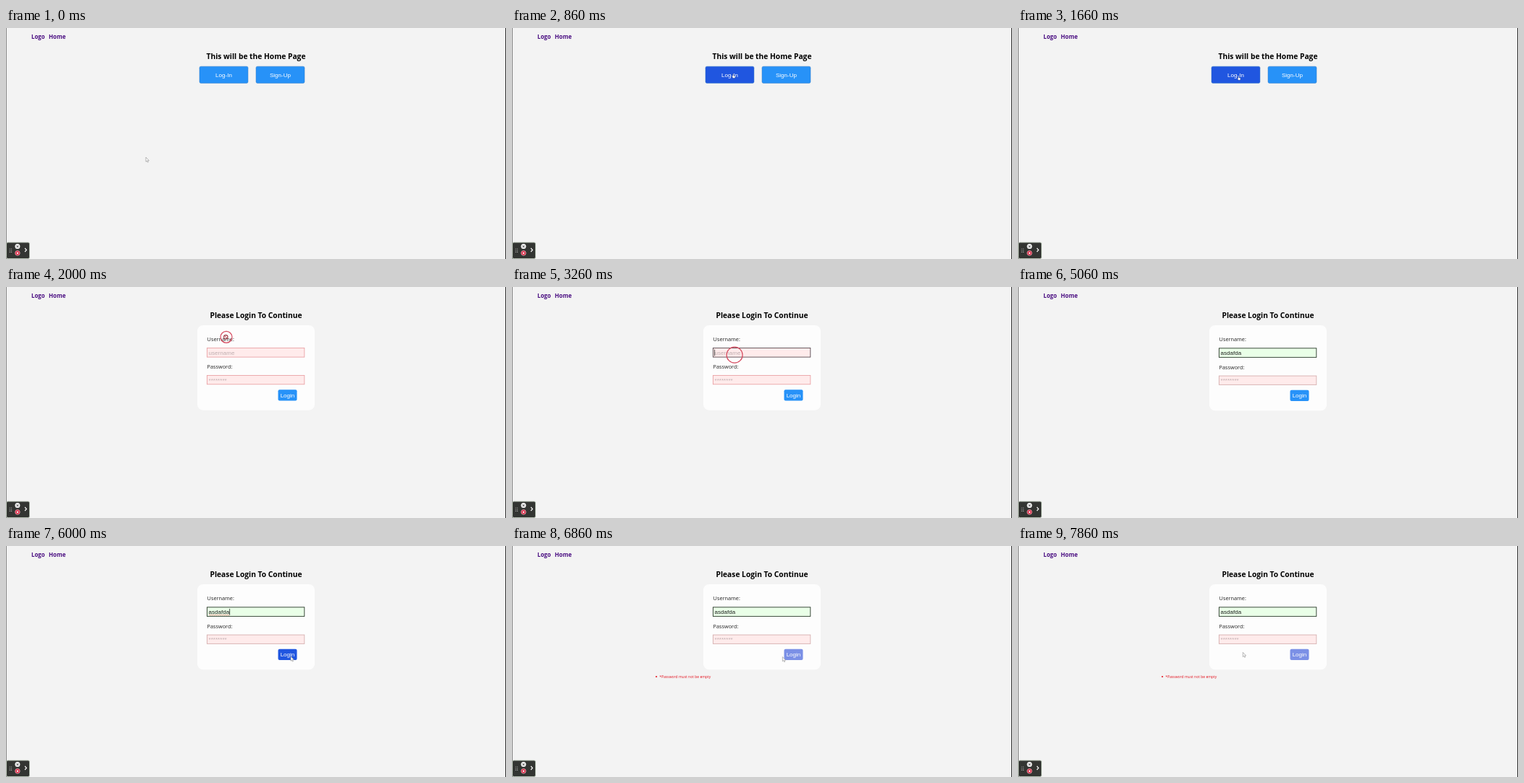
An HTML page for the animation above (8 s loop, 690x320 px).

```html
<!DOCTYPE html>
<html lang="en">
<head>
<meta charset="utf-8">
<title>Login demo</title>
<style>
  html, body { margin: 0; width: 100%; height: 100%; overflow: hidden; background: #f3f3f3; }
  svg { display: block; width: 690px; height: 320px; }
  text { white-space: pre; }
  .ui { font-family: "Open Sans", "Noto Sans", sans-serif; }
  .form { font-family: "Liberation Sans", Arial, sans-serif; font-size: 8.05px; }
  .nav { font-size: 7.9px; font-weight: 700; fill: #4b0f82; }
  .title { font-size: 10.26px; font-weight: 700; text-anchor: middle; }
  .label { font-size: 7.3px; fill: #222; }
  .error { font-size: 5px; fill: #e3131f; }
  .btn { fill: #fff; text-anchor: middle; }
  .hint { fill: #bfaeb0; }
</style>
</head>
<body>
<svg viewBox="0 0 690 320">
  <rect width="690" height="320" fill="#f3f3f3"/>
  <path d="M.5 0V320" stroke="#8a8a8a"/>
  <path d="M689.5 0V320" stroke="#333"/>
  <text class="ui nav" x="35" y="15.4">Logo</text>
  <text class="ui nav" x="59" y="15.4">Home</text>
  <text class="ui title" id="title" x="345" y="43.2"></text>

  <g id="home">
    <rect id="logIn" x="267" y="53.2" width="67" height="23.2" rx="2" stroke="#3a7fc4" stroke-width=".5"/>
    <rect x="345" y="53.2" width="67" height="23.2" rx="2" fill="#2792f8" stroke="#3a7fc4" stroke-width=".5"/>
    <text class="form btn" x="300.5" y="67.6">Log-In</text>
    <text class="form btn" x="378.5" y="67.6">Sign-Up</text>
  </g>

  <g id="login">
    <rect id="card" x="264" y="53" width="162" rx="8" fill="#fdfdfd"/>
    <text class="ui label" x="277.6" y="75">Username:</text>
    <rect id="user" x="277.5" y="84.5" width="134.3" height="12.6" stroke-width=".9"/>
    <text class="form" id="typed" x="279.6" y="93.7"></text>
    <path id="squiggle" fill="none" stroke="#e24848" stroke-width=".6"/>
    <path id="caret" stroke="#222" stroke-width=".8"/>
    <g id="lower">
      <text class="ui label" x="277.6" y="113">Password:</text>
      <rect id="pass" x="277.5" y="122.5" width="134.3" height="12.3" fill="#ffebeb" stroke-width=".9"/>
      <text class="form hint" x="279.6" y="131.8">********</text>
      <rect id="send" x="375.5" y="142.2" width="26" height="15.3" rx="2"/>
      <text class="form btn" x="388.5" y="152.7">Login</text>
    </g>
    <g id="error">
      <circle cx="199.2" cy="181" r="1.1" fill="#e3131f"/>
      <text class="ui error" x="203.4" y="182.8">*Password must not be empty</text>
    </g>
  </g>

  <g id="recorder">
    <rect x=".5" y="297" width="32" height="22.5" rx="2" fill="#333532" stroke="#b9c4b6"/>
    <g id="grip" fill="#c9c9c9"></g>
    <circle cx="15.9" cy="302.6" r="3.5" fill="#f4f4f4"/>
    <path d="M14.6 301.3l2.6 2.6m0-2.6l-2.6 2.6" stroke="#333" stroke-width=".9"/>
    <circle cx="15.9" cy="311.8" r="3.3" fill="#d9304c" stroke="#efb3bc" stroke-width=".7"/>
    <rect x="14.9" y="310.8" width="2" height="2" fill="#fff"/>
    <path d="M26 305l2.4 2.5-2.4 2.5" fill="none" stroke="#fff" stroke-width="1.1"/>
  </g>

  <circle id="ring" fill="none" stroke="#d54a5f" stroke-width="1.2"/>
  <g id="busy" fill="none" stroke="#9c2f3c">
    <circle r="2.7" stroke-width="1.1"/>
    <path d="M-1.7-1.7L1.7 1.7" stroke-width=".9"/>
  </g>
  <path id="arrow" d="M0 0V6.2L1.4 5 2.4 7.1 3.4 6.6 2.5 4.6H4.4Z" fill="#fafafa" stroke="#8d8d8d" stroke-width=".6"/>
  <path id="hand" d="M-.4-2Q.2-2.6.7-2L.9 0 2.8.6Q3.2 1 3 2L2.5 3.6H.1L-1.6 1.2-.3 1Z" fill="#fff" stroke="#243c80" stroke-width=".5"/>
</svg>
<script>
const LOOP = 8000;
const WORD = "asdafda";
const BLUE = "#2792f8", HOVER = "#2056e0", USED = "#7b90e6";
const PAGE = 2000, FOCUS = 3060, TYPE = 3680, KEY = 140, SEND = 6400, REPLY = 6600;

// time, x, y of the pointer
const PATH = [
  [0, 193, 179], [200, 202, 168], [660, 297, 78], [860, 305, 66], [1860, 304, 69],
  [2200, 304, 70], [2860, 307, 94], [5260, 309, 96], [5860, 391, 151],
  [6000, 393, 153], [6660, 392, 152], [7260, 320, 158], [7660, 312, 154], [7860, 310.3, 147.3]
];
const CLICKS = [1860, FOCUS, SEND];

const el = {};
document.querySelectorAll("[id]").forEach(n => el[n.id] = n);
const set = (name, attrs) => {
  for (const k in attrs) el[name].setAttribute(k, attrs[k]);
};
const show = (name, on) => set(name, { visibility: on ? "inherit" : "hidden" });
const place = (name, [x, y]) => set(name, { transform: `translate(${x} ${y})` });

for (let i = 0; i < 6; i++) {
  const dot = document.createElementNS("http://www.w3.org/2000/svg", "circle");
  dot.setAttribute("cx", 5.3 + (i % 2) * 2.3);
  dot.setAttribute("cy", 306 + (i >> 1) * 2.2);
  dot.setAttribute("r", .55);
  el.grip.append(dot);
}

function pointer(t) {
  const i = PATH.findIndex(p => p[0] > t);
  if (i < 0) return PATH.at(-1).slice(1);
  const [a, b] = [PATH[i - 1], PATH[i]];
  const u = (t - a[0]) / (b[0] - a[0]);
  const e = u * u * (3 - 2 * u);
  return [a[1] + (b[1] - a[1]) * e, a[2] + (b[2] - a[2]) * e];
}

function drawForm(t) {
  const count = Math.max(0, Math.min(WORD.length, Math.floor((t - TYPE) / KEY) + 1));
  const valid = count > 0;
  const focused = t >= FOCUS && t < SEND;
  const shift = valid ? .6 : 0;

  set("card", { height: 117.7 + shift });
  set("lower", { transform: `translate(0 ${shift})` });
  set("user", {
    fill: valid ? "#e9ffe7" : "#ffebeb",
    stroke: valid ? "#2b3a2b" : focused ? "#5a4a50" : "#eba3a6",
    y: 84.5 + shift / 2
  });
  set("pass", { stroke: valid ? "#d6b0b0" : "#eba3a6" });
  el.typed.textContent = valid ? WORD.slice(0, count) : "username";
  set("typed", { fill: valid ? "#222" : "#bfaeb0", y: valid ? 94 : 93.7 });

  const end = 279.6 + (valid ? el.typed.getComputedTextLength() : -.4);
  const since = t - (valid ? TYPE + (count - 1) * KEY : FOCUS);
  set("caret", { d: `M${end + .4} ${86.6 + shift / 2}v8.8` });
  show("caret", focused && since % 1000 < 500);

  set("squiggle", { d: "M280 95.6" + "q.7-1 1.4 0t1.4 0".repeat(10) });
  show("squiggle", focused && t >= 5460);

  const over = t >= 5860 && t < REPLY;
  set("send", { fill: t >= REPLY ? USED : over ? HOVER : BLUE });
  show("error", t >= REPLY);
}

function drawPointer(t) {
  const at = pointer(t);
  const onLogIn = t >= 760 && t < PAGE;
  const inField = t >= 2800 && t < 5460;
  const busy = t >= PAGE && t < 2200;
  place("arrow", at);
  place("hand", at);
  place("busy", [at[0] - .7, at[1]]);
  show("hand", onLogIn);
  show("busy", busy);
  show("arrow", !onLogIn && !inField && !busy);

  const click = CLICKS.find(c => t >= c && t < c + 400);
  show("ring", click !== undefined);
  if (click === undefined) return;
  const age = t - click;
  set("ring", {
    cx: at[0], cy: at[1],
    r: Math.min(11, 1 + age / 20),
    opacity: age <= 200 ? 1 : 1 - (age - 200) / 200
  });
}

function draw(ms) {
  const phase = ms % 200;
  const t = ms - phase + (phase >= 60 ? 60 : 0);
  const onLogin = t >= PAGE;
  el.title.textContent = onLogin ? "Please Login To Continue" : "This will be the Home Page";
  show("home", !onLogin);
  show("login", onLogin);
  set("logIn", { fill: t >= 760 ? HOVER : BLUE });
  drawForm(t);
  if (!onLogin) ["caret", "squiggle", "error"].forEach(n => show(n, false));
  drawPointer(t);
}

function tick() {
  draw(performance.now() % LOOP);
  requestAnimationFrame(tick);
}
tick();
</script>
</body>
</html>
```
